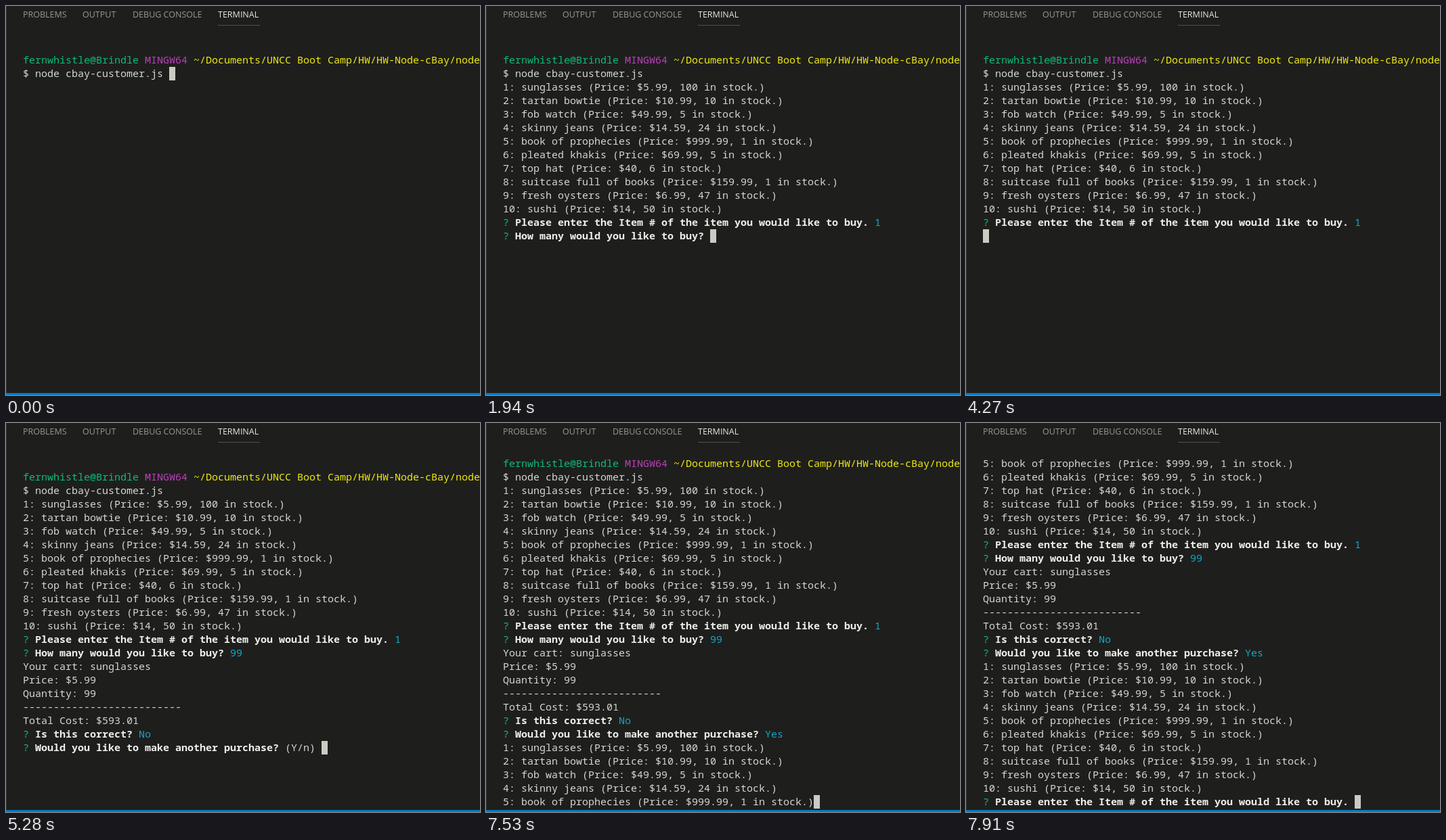
These frames come from a looping animation (700x575 px, 8000 ms). An HTML page:

```html
<!DOCTYPE html>
<html lang="en">
<head>
<meta charset="utf-8">
<title>Terminal shop</title>
<style>
  html, body { margin: 0; width: 100%; height: 100%; overflow: hidden; background: #1e1f1c; }
  #stage { position: relative; width: 700px; height: 575px; overflow: hidden; background: #1e1f1c; }
  #stage::before { content: ""; position: absolute; left: 0; top: 0; width: 1px; height: 572px; background: #343531; }
  #stage::after { content: ""; position: absolute; left: 0; top: 572px; width: 700px; height: 3px; background: #007acc; }
  .tab { position: absolute; top: 3px; font: 12.5px/20px "Open Sans", "Noto Sans", sans-serif; color: #989894; white-space: pre; }
  .tab.on { color: #e7e7e7; }
  #line { position: absolute; left: 313px; top: 28px; width: 62px; height: 1px; background: #51514b; }
  #term { position: absolute; left: 25px; top: 50px; width: 675px; height: 520px; overflow: hidden;
          font: 15px/20px "Noto Sans Mono", "DejaVu Sans Mono", monospace; font-variant-ligatures: none; color: #d6d6d3; }
  .row { position: relative; height: 20px; white-space: pre; }
  .row > span { position: relative; top: -1px; }
  .g { color: #0dbc79; }
  .m { color: #bc3fbc; }
  .y { color: #efe914; }
  .c { color: #11a8cd; }
  b { color: #eeeeec; font-weight: 700; }
  i { position: absolute; top: 0; width: 9px; height: 20px; background: #cbcbc4; }
</style>
</head>
<body>
<div id="stage">
  <div class="tab" style="left:25px">PROBLEMS</div>
  <div class="tab" style="left:113px">OUTPUT</div>
  <div class="tab" style="left:187px">DEBUG CONSOLE</div>
  <div class="tab on" style="left:313px">TERMINAL</div>
  <div id="line"></div>
  <div id="term"></div>
</div>
<script>
const LOOP = 8000, ROWS = 26, CELL = 9;
const term = document.getElementById("term");

const paint = (cls, text) => `<span class="${cls}">${text}</span>`;
const ask = (text, rest = "") => `${paint("g", "?")} <b>${text}</b> ${rest}`;
const answer = (text, value) => ask(text, paint("c", value));

const items = [
  ["sunglasses", "5.99", 100], ["tartan bowtie", "10.99", 10], ["fob watch", "49.99", 5],
  ["skinny jeans", "14.59", 24], ["book of prophecies", "999.99", 1], ["pleated khakis", "69.99", 5],
  ["top hat", "40", 6], ["suitcase full of books", "159.99", 1], ["fresh oysters", "6.99", 47],
  ["sushi", "14", 50]
].map(([name, price, stock], i) => `${i + 1}: ${name} (Price: $${price}, ${stock} in stock.)`);

const PICK = "Please enter the Item # of the item you would like to buy.";
const COUNT = "How many would you like to buy?";
const CORRECT = "Is this correct?";
const AGAIN = "Would you like to make another purchase?";

const head = ["",
  `${paint("g", "fernwhistle@Brindle")} ${paint("m", "MINGW64")} ${paint("y", "~/Documents/UNCC Boot Camp/HW/HW-Node-cBay/node")}`];
const run = [...head, "$ node cbay-customer.js "];
const listed = [...run, ...items];
const picked = [...listed, answer(PICK, "1")];
const cart = [...picked, answer(COUNT, "99"), "Your cart: sunglasses", "Price: $5.99", "Quantity: 99",
  "-".repeat(26), "Total Cost: $593.01"];
const refused = [...cart, answer(CORRECT, "No")];
const again = [...refused, answer(AGAIN, "Yes")];

// Each step: start time, settled rows, last row (the cursor follows it)
const steps = [
  [0, head, "$ node cbay-customer.js "],
  [80, run, ""],
  [390, listed, ""],
  [540, listed, ask(PICK)],
  [1470, listed, ask(PICK, "1")],
  [1850, picked, ""],
  [1940, picked, ask(COUNT)],
  [3560, picked, ""],
  [3640, picked, ask(COUNT, "9")],
  [3810, picked, ask(COUNT, "99")],
  [4270, picked, ""],
  [4340, cart, ask(CORRECT, "(Y/n) ")],
  [4730, cart, ask(CORRECT, "(Y/n) n")],
  [5110, cart, ""],
  [5190, refused, ""],
  [5280, refused, ask(AGAIN, "(Y/n) ")],
  [6350, refused, ""],
  [6430, refused, ask(AGAIN, "(Y/n) y")],
  [6890, refused, ""],
  [6980, [...again, items[0]], ""],
  [7530, [...again, ...items.slice(0, 4)], items[4]],
  [7770, [...again, ...items.slice(0, 8)], items[8]],
  [7840, [...again, ...items], ""],
  [7910, [...again, ...items], ask(PICK)]
];

function show([, rows, last]) {
  const column = last.replace(/<[^>]*>/g, "").length;
  const cursor = `<i style="left:${column * CELL}px"></i>`;
  term.innerHTML = [...rows, last].slice(-ROWS)
    .map((text, i, all) => `<div class="row"><span>${text}</span>${i === all.length - 1 ? cursor : ""}</div>`)
    .join("");
}

let shown = null;
const start = performance.now();
function tick() {
  const t = (performance.now() - start) % LOOP;
  const step = steps.findLast(s => s[0] <= t);
  if (step !== shown) show(shown = step);
  requestAnimationFrame(tick);
}
tick();
</script>
</body>
</html>
```
